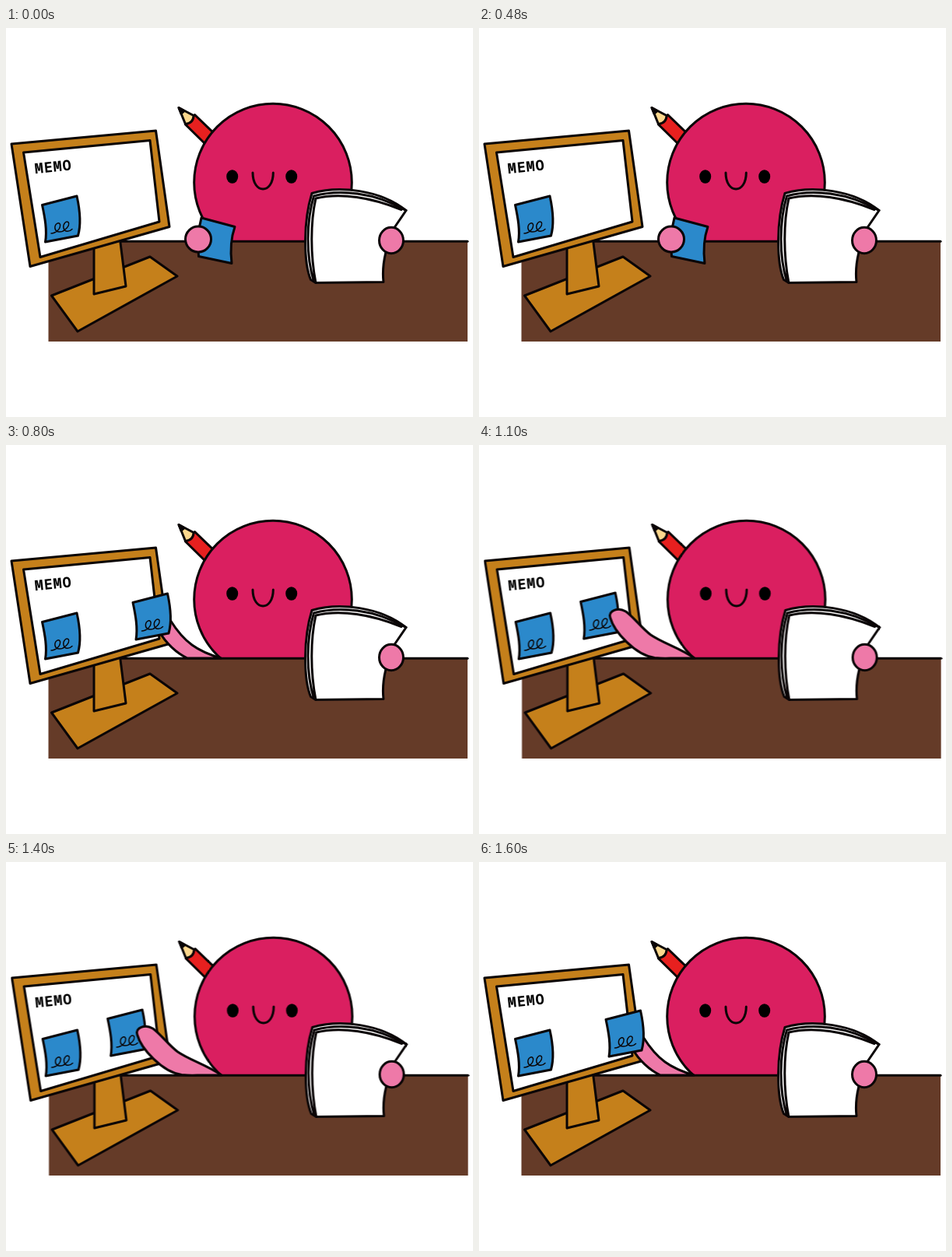
An HTML page for the animation above (1900 ms loop, 600 px wide and 500 px high).

```html
<!DOCTYPE html>
<html lang="en">
<head>
<meta charset="utf-8">
<title>Sticking memos</title>
<style>
  html, body { margin: 0; width: 100%; height: 100%; overflow: hidden; background: #fff; }
  svg { display: block; width: 600px; height: 500px; }
  .ink { stroke: #0a0506; stroke-width: 3; stroke-linejoin: round; stroke-linecap: round; }
  .thin { fill: none; stroke: #0a0506; stroke-width: 1.5; stroke-linecap: round; }
  .line { fill: none; }
  .wood { fill: #c5801b; }
  .paper { fill: #fff; }
  .blue { fill: #2b89cb; }
  .pink { fill: #ee79a8; }
  text { font: 700 18.5px "Noto Sans Mono", "DejaVu Sans Mono", monospace; letter-spacing: .9px; }

  .scene, .hold, .reach, .stick { animation: 1.9s step-end infinite; }
  .reach, .stick { opacity: 0; }
  .scene { animation-name: nudge; }
  .hold { animation-name: hold; }
  .reach { animation-name: reach; }
  .stick { animation-name: stick; }
  @keyframes nudge {
    0% { transform: none; }
    57.895% { transform: translateX(.6px); }
    84.21% { transform: none; }
  }
  @keyframes hold { 0% { opacity: 1; } 42.105%, 100% { opacity: 0; } }
  @keyframes reach {
    0% { opacity: 0; }
    42.105% { opacity: 1; }
    57.895% { opacity: 0; }
    84.21%, 100% { opacity: 1; }
  }
  @keyframes stick {
    0% { opacity: 0; }
    57.895% { opacity: 1; }
    84.21%, 100% { opacity: 0; }
  }
</style>
</head>
<body>
<svg viewBox="0 0 600 500">
  <defs>
    <g id="memo">
      <path class="ink blue" d="M46.500 227.500L91 216C95 234 96.500 253 92.500 267L50.500 275C53 260 50 244 46.500 227.500Z"/>
      <path class="thin" d="M58 264C64 264 70.500 258 69.500 252.500C68 248.500 62 252 63 258C64.500 263.500 72 263 76 259C80 256 82 252 80 249.500C77 247.500 73 252 74 257C75.500 262.500 81 262.500 85 258.500"/>
    </g>
  </defs>

  <g class="scene">
    <!-- pencil -->
    <path class="ink" fill="#e7201f" d="M230.500 124L242.500 111.500L270 138L258 151Z"/>
    <path class="ink" fill="#fbd78d" d="M222 102.500L241 112.500Q241 122 230.500 123.500Z"/>
    <path class="ink" fill="#0a0506" d="M222 102.500L229 106.500L225 110Z"/>

    <!-- face -->
    <circle class="ink" fill="#da1f60" cx="343" cy="198.500" r="101.300"/>
    <ellipse cx="290.700" cy="191" rx="7.500" ry="8.800"/>
    <ellipse cx="366.700" cy="191" rx="7.500" ry="8.800"/>
    <path class="ink line" d="M317 186C317 214 343.300 214 343.300 186"/>

    <!-- desk -->
    <path fill="#fff" d="M200 274H500V310H200Z"/>
    <path fill="#653b28" d="M54.500 274H593V403H54.500Z"/>
    <path class="ink line" d="M140 274.300H593"/>

    <!-- monitor -->
    <path class="ink wood" d="M58.500 344L185 294L220 319L92 390Z"/>
    <path class="ink wood" d="M113 272L146 268L154 332L113 342Z"/>
    <path class="ink wood" d="M7 149L192.500 132L210 255.500L31 306.500Z"/>
    <path class="ink paper" d="M22.500 160L185 144.500L197 249L44 294.500Z"/>
    <text transform="translate(37.500 187.300) rotate(-6)">MEMO</text>
    <use href="#memo"/>

    <!-- notebook -->
    <path class="ink paper" d="M393 212.500C428 202 481 208 514 234.500L498 258C491 276 482 300 485 326.500L398 327.500L391.500 323.500C382 300 382 248 393 212.500Z"/>
    <path class="ink line" d="M398 327.500C391 292 391 250 398 219C430 211 470 218 508 233.500M395.500 325.500C385 292 386 248 395.500 216C428 207 473 211 514 234.500"/>
    <ellipse class="ink pink" cx="495" cy="273" rx="15.500" ry="16.700"/>

    <g class="hold">
      <path class="ink blue" d="M251 244L294 255.500C289 270 288 286 290 302.500L247.500 293.500C246 276 247 259 251 244Z"/>
      <circle class="ink pink" cx="247" cy="271.500" r="16.500"/>
    </g>

    <g class="reach">
      <path class="ink pink" d="M196 238C205 255 220 268 233 274H276C246 265 229 254 211 225Z"/>
      <use href="#memo" x="116.500" y="-25"/>
    </g>

    <g class="stick">
      <use href="#memo" x="83.500" y="-26"/>
      <path class="ink pink" d="M276 274C258 261 236 255 220 244C208 235 198 221 188 214C178 208 165 213 168 222C173 240 200 270 225 273.500Q236 274.500 245 274Z"/>
    </g>
  </g>
</svg>
</body>
</html>
```
